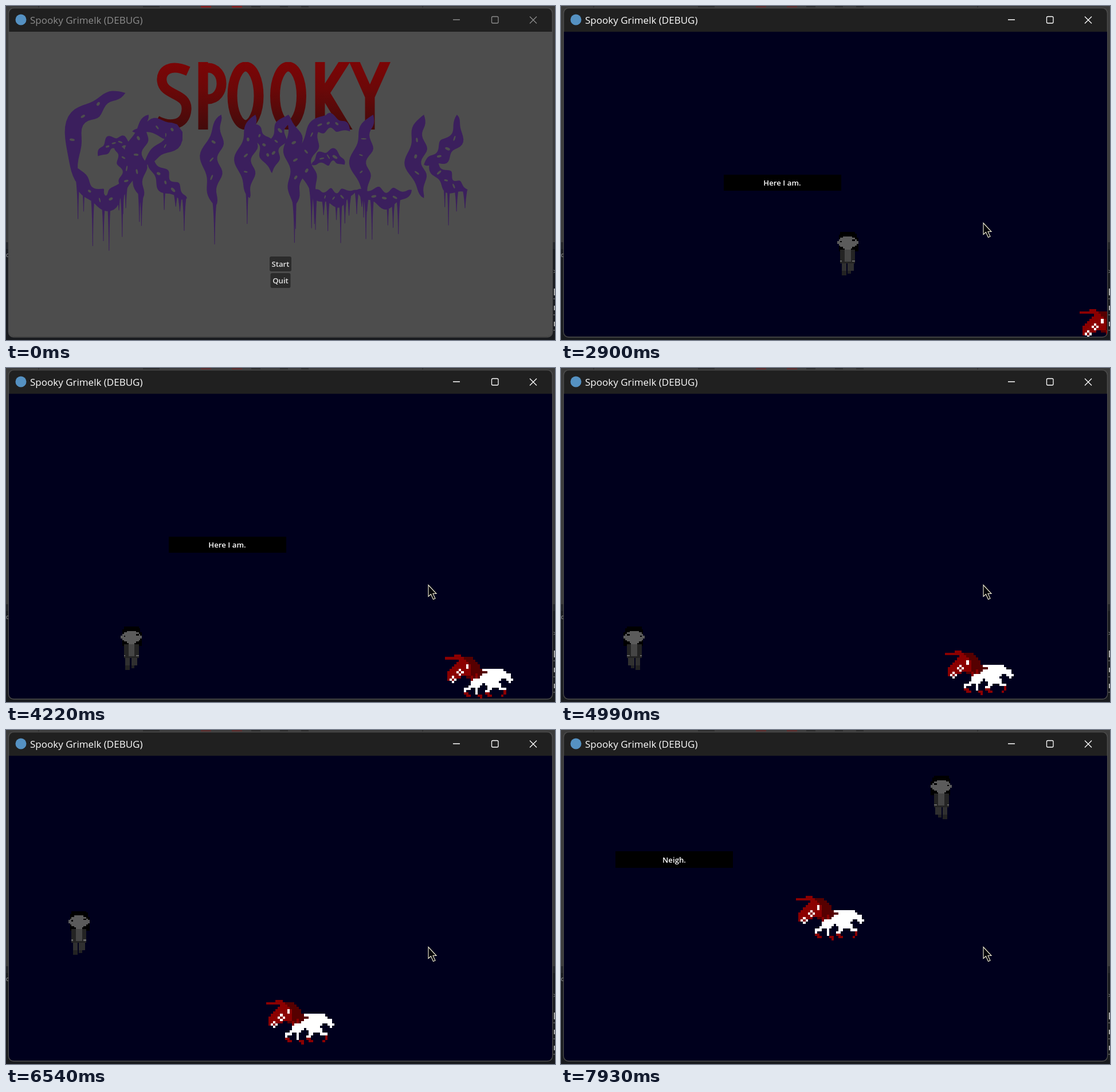
These frames come from a looping animation (958x584 px, 8 s). An HTML page:

```html
<!DOCTYPE html>
<html lang="en">
<head>
<meta charset="utf-8">
<title>Spooky Grimelk</title>
<style>
  html, body { margin: 0; width: 100%; height: 100%; overflow: hidden; background: #1b1d21; }
  svg { display: block; width: 958px; height: 584px; }
  text { font-family: "Open Sans", "Noto Sans", sans-serif; }
  .ui { font-size: 13.2px; font-weight: 600; fill: #e2e2e2; text-anchor: middle; }
  .say { fill: #fff; }
  .pixels { shape-rendering: crispEdges; }
</style>
</head>
<body>
<svg viewBox="0 0 958 584">
  <defs>
    <linearGradient id="blood" gradientUnits="userSpaceOnUse" x1="0" y1="98" x2="0" y2="216">
      <stop offset="0" stop-color="#7c0506"/>
      <stop offset=".4" stop-color="#6b0808"/>
      <stop offset="1" stop-color="#420b0b"/>
    </linearGradient>
    <clipPath id="pane"><path d="M5 45H953V570a8 8 0 0 1-8 8H13a8 8 0 0 1-8-8Z"/></clipPath>
    <clipPath id="line"><rect x="250" y="98" width="440" height="118"/></clipPath>
  </defs>

  <g id="desktop">
    <rect width="958" height="584" fill="#191b1f"/>
    <rect width="958" height="413" fill="#3b3b3b"/>
    <rect y="413" width="958" height="12" fill="#232529"/>
    <path d="M57 0V4M727 0V4" stroke="#222"/>
    <path id="blots" d="M340 2H358M394 2H412" stroke="#7d1b1b" stroke-width="4"/>
    <path d="M239 1H268M428 1H444M478 1H492M515 1H528" stroke="#2b2b2b" stroke-width="3"/>
    <g font-size="10" fill="#a9a9a9"><text x="0" y="439">c</text><text x="955" y="468">&gt;</text></g>
    <path d="M955 512H958M955 540H958M955 567H958" stroke="#888"/>
    <path d="M957 494V506M957 524V532M957 552V560" stroke="#aaa" stroke-width="2"/>
  </g>

  <rect x="4.5" y="3.5" width="949" height="575.5" rx="9" fill="#202020" stroke="#4b4b4b" stroke-width="1.6"/>
  <circle cx="26" cy="24" r="9.5" fill="#5591c2"/>
  <g id="bar">
    <text x="42" y="31" font-size="17" fill="currentColor">Spooky Grimelk (DEBUG)</text>
    <g fill="none" stroke="currentColor" stroke-width="1.3">
      <path d="M780 24H792M914 18.5L926 30.5M926 18.5L914 30.5"/>
      <rect x="847.5" y="18.5" width="11.5" height="11.5" rx="2"/>
    </g>
  </g>

  <g clip-path="url(#pane)">
    <g id="menu">
      <rect x="5" y="45" width="948" height="534" fill="#4d4d4d"/>
      <g fill="none" stroke="url(#blood)" stroke-width="17" clip-path="url(#line)">
        <path d="M318 114C287 100 270 113 272 131C275 158 317 151 315 181C313 211 283 211 263 200"/>
        <path d="M344 216V98M344 108H352C384 108 384 163 352 163H344"/>
        <ellipse cx="418" cy="157" rx="23" ry="51"/>
        <ellipse cx="492.5" cy="157" rx="23" ry="51"/>
        <path d="M548 98V216M598 86L556 152L602 228"/>
        <path d="M603 86L635 158L667 86M635 152V216"/>
      </g>
      <path id="slime" fill="#3b1f5d"/>
      <g id="holes" fill="#4d4d4d"></g>
      <rect id="start" x="460" y="438" width="38" height="26" rx="3"/>
      <rect x="461.5" y="467" width="35" height="26" rx="3" fill="#2b2b2b"/>
      <text class="ui" x="479" y="456">Start</text>
      <text class="ui" x="479" y="485">Quit</text>
    </g>
    <g id="game">
      <rect x="5" y="45" width="948" height="534" fill="#00001d"/>
      <g id="hello">
        <rect x="284" y="295" width="205" height="28"/>
        <text class="ui say" x="386" y="314">Here I am.</text>
      </g>
      <g id="neigh">
        <rect x="95" y="212" width="205" height="29"/>
        <text class="ui say" x="197.5" y="232">Neigh.</text>
      </g>
      <g id="beast" class="pixels"></g>
      <g id="hero" class="pixels"></g>
    </g>
  </g>
  <path id="cursor" d="M.5 .5V20.5L5 16.5L9 25.5L12.5 24L8.5 15.5H14.5Z" fill="#05050a" stroke="#f4f1d4" stroke-width="1.1"/>
</svg>

<script>
const LOOP = 8000;
const $ = id => document.getElementById(id);
let seed = 7;
const random = () => (seed = seed * 16807 % 2147483647) / 2147483647;

// Outlines in sprite cells; a cell is filled when its centre lies inside.
const heroShapes = [
  { fill: '#000', d: 'M2 0H12V1H13V4H14V13H10V12H4V13H1V2H2Z' },
  { fill: '#5b5b5b', d: 'M0 7A7 4 0 0 1 14 7A7 4 0 0 1 0 7ZM5 11H9V13H5Z' },
  { fill: '#000', d: 'M2 6H3V7H2ZM10 5H12V6H10Z' },
  { fill: '#242424', d: 'M2 12H12V21H2Z' },
  { fill: '#454545', d: 'M5 12H9V20H5Z' },
  { fill: '#666', d: 'M2 19H3V20H2ZM10 19H12V20H10Z' },
  { fill: '#303030', d: 'M3 21H6V26H3ZM7 21H11V26H7Z' },
  { fill: '#232323', d: 'M3 26H6V29H3ZM7 26H9V28H7Z' }
];
const beastShapes = [
  { fill: '#fff', d: 'M17 6H24L28 8.6L29 11L27.5 12L25 9.4L23 11L24 14H19L17 12L14 14.2H11V11L15 8Z' },
  { fill: '#fff', d: 'M12.5 13.5L8.5 14.5V16M13.5 13V17M20.5 13.5L17.5 15.5M22 13.5L25.5 14.5', width: 1.2 },
  { fill: '#560000', d: 'M8 1H12L16.5 7H18V8H16L14 10H9Z' },
  { fill: '#8b0000', d: 'M0 1H8L11 5V9H8L3 11H1V8L7 2H0ZM4 0H7V1H4Z' },
  { fill: '#8b0000', d: 'M11.5 9V11M13.5 8V10M8 16.5H10M9 17.5H11M14 17.5H16M15 18.5H16M17 16.5H19M18 17.5H20M25.5 15V17M24 17.5H25', width: 1 },
  { fill: '#fff', d: 'M9 4H10V6H9ZM6.5 6L8 7.5L6.5 9L5 7.5ZM6 7H7V8H6ZM3.5 9L5 10.5L3.5 12L2 10.5ZM3 10H4V11H3Z' }
];
const ink = document.createElement('canvas').getContext('2d');
function sprite(id, shapes, cell) {
  $(id).innerHTML = shapes.map(({ fill, d, width }) => {
    const shape = new Path2D(d);
    ink.lineWidth = width || 1;
    let blocks = '';
    for (let y = 0; y < 30; y++) for (let x = 0; x < 30; x++) {
      const inside = width ? ink.isPointInStroke(shape, x + .5, y + .5) : ink.isPointInPath(shape, x + .5, y + .5, 'evenodd');
      if (inside) blocks += `M${x * cell} ${y * cell}h${cell}v${cell}h${-cell}z`;
    }
    return `<path fill="${fill}" d="${blocks}"/>`;
  }).join('');
}
sprite('hero', heroShapes, 2.62);
sprite('beast', beastShapes, 4.115);

// Letter skeletons in a 10 by 10 box, grown into slimy limbs.
const skeletons = {
  G: 'M9 0Q-5 2 1 9M0 7Q5 13 9 8M8 10Q11 7 7 5M4 6Q7 4 10 5',
  R: 'M3 0Q-1 4 2 10M0 2Q14 0 2 6M3 5Q6 9 10 10',
  I: 'M6 0Q3 5 5 11',
  M: 'M2 0Q-1 5 1 10M1 1Q4 3 5 7M8 0Q5 3 5 7M8 0Q10 5 9 11',
  E: 'M5 0Q-2 4 3 10M1 2Q6 0 9 2M2 6Q6 4 8 6M2 9Q6 11 10 9',
  L: 'M3 0Q-1 5 2 10M0 9Q6 11 10 9',
  K: 'M2 0Q-1 5 2 10M8 0Q9 4 2 6M3 5Q6 9 10 9'
};
const curve = document.createElementNS('http://www.w3.org/2000/svg', 'path');
let slime = '', holes = '';
function growLimb(d, left, top, height) {
  curve.setAttribute('d', d);
  const steps = 32, long = curve.getTotalLength(), phase = random() * 6;
  const spot = p => {
    const { x, y } = curve.getPointAtLength(p * long);
    return [left + x * 9.6, top + y * height / 10];
  };
  const sides = [[], []];
  for (let i = 0; i <= steps; i++) {
    const p = i / steps, [x, y] = spot(p), [ax, ay] = spot(p - .02), [bx, by] = spot(p + .02);
    const slope = Math.atan2(by - ay, bx - ax);
    const girth = Math.min(19, 8 + long) * Math.sin(Math.PI * p) ** .75;
    sides.forEach((side, k) => {
      const r = girth * (.8 + .3 * Math.sin(p * (14 + 4 * k) + phase + k)) * (k ? -1 : 1);
      side.push([x - Math.sin(slope) * r, y + Math.cos(slope) * r]);
    });
    if (i % 3 === 0 && y > 300 && random() < .7) {
      const end = y + 25 + random() * height * .38;
      slime += `M${x - 4} ${y}Q${x - 1} ${y + 18} ${x - .5} ${end}h1Q${x + 1} ${y + 18} ${x + 4} ${y}Z`;
    }
    if (i % 6 === 4 && girth > 10) {
      holes += `<ellipse rx="${1 + random() * 1.5}" ry="${3 + random() * 2}" transform="translate(${x} ${y}) rotate(${random() * 180})"/>`;
    }
  }
  slime += 'M' + [...sides[0], ...sides[1].reverse()].join('L') + 'Z';
}
Object.values(skeletons).forEach((d, i) => {
  const top = i ? 190 : 152;
  d.match(/M[^M]+/g).forEach(part => growLimb(part, 122 + 98 * i, top, 336 - top));
});
$('slime').setAttribute('d', slime);
$('holes').innerHTML = holes;

// The hero walks at one pace: start time, then where to.
const PACE = .562;
const walks = [[2486, 482, 395], [3400, 482, 452], [3720, 109, 452], [6300, 109, 80], [6962, 645, 80]];
function heroAt(t) {
  let x = 482, y = 281, moved = 0;
  for (const [from, toX, toY] of walks) {
    if (t <= from) break;
    const far = Math.hypot(toX - x, toY - y), gone = Math.min(far, (t - from) * PACE);
    x += (toX - x) * gone / far;
    y += (toY - y) * gone / far;
    moved = from + gone / PACE;
  }
  return { x, y, mirrored: moved && Math.floor((moved - 100) / 200) % 2 };
}

// The beast heads for the hero, slowly gaining speed.
const ENTER = 2340, STEP = 10;
const trail = [{ x: 954, y: 551 }];
for (let t = ENTER; t < LOOP; t += STEP) {
  const { x, y } = trail[trail.length - 1], prey = heroAt(t);
  const reach = STEP * (.0563 + 1.47e-5 * t) / Math.hypot(prey.x - x, prey.y - y);
  trail.push({ x: x + (prey.x - x) * reach, y: y + (prey.y - y) * reach });
}
const beastAt = t => trail[Math.max(0, Math.round((t - ENTER) / STEP))];

function ease(t, from, to) {
  const p = Math.min(1, Math.max(0, (t - from) / (to - from)));
  return p * p * (3 - 2 * p);
}
function cursorAt(t) {
  const enter = ease(t, 250, 900), leave = ease(t, 1480, 1670);
  return { x: 764.5 - 285 * enter + 257 * leave, y: 592 - 138 * enter - 75 * leave };
}

const place = (id, { x, y }, extra = '') => $(id).setAttribute('transform', `translate(${x} ${y})${extra}`);
const show = (id, on) => { $(id).style.display = on ? '' : 'none'; };

function draw(t) {
  const focused = t >= 1070, playing = t >= 1210, hero = heroAt(t);
  $('bar').style.color = focused ? '#fff' : '#8c8c8c';
  $('blots').style.opacity = focused ? .45 : 1;
  $('start').style.fill = t >= 820 ? '#3a3a3a' : '#2b2b2b';
  show('menu', !playing);
  show('game', playing);
  show('hello', t >= 2600 && t < 4500);
  show('neigh', t >= 7650);
  show('beast', t >= ENTER);
  place('hero', hero, hero.mirrored ? ' translate(37 0) scale(-1 1)' : '');
  place('beast', beastAt(t));
  place('cursor', cursorAt(t));
}
const began = performance.now();
function tick() {
  draw((performance.now() - began) % LOOP);
  requestAnimationFrame(tick);
}
tick();
</script>
</body>
</html>
```
